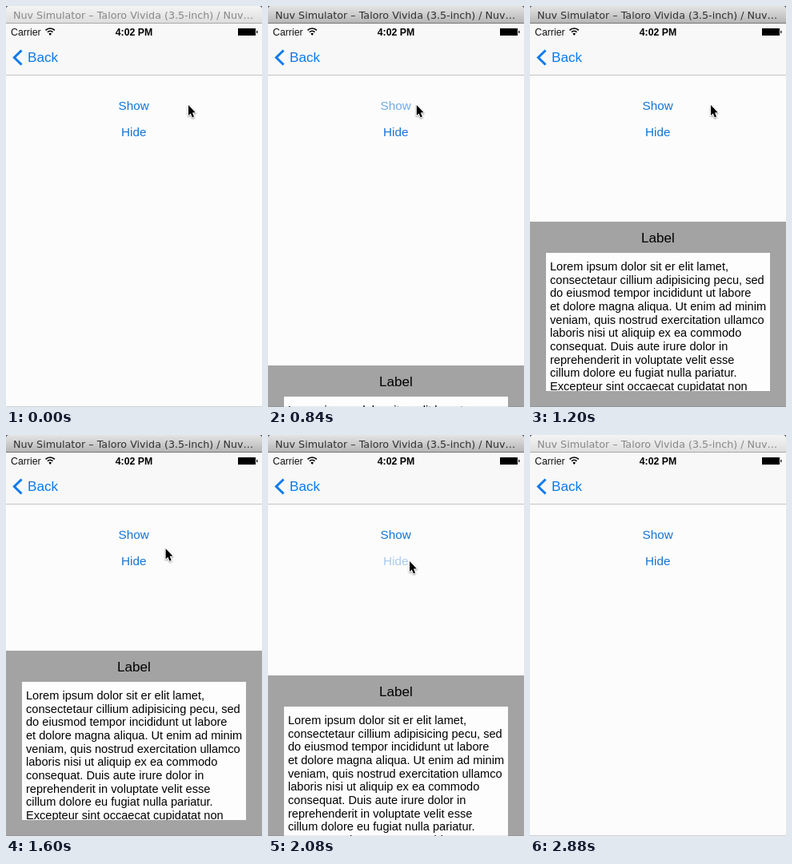
Recreate the animation shown at these times as an HTML page with a canvas. Size 320 by 502 pixels, loop 2.92 s.

```html
<!DOCTYPE html>
<html lang="en">
<head>
<meta charset="utf-8">
<title>Sliding panel</title>
<style>
html, body { margin: 0; width: 100%; height: 100%; overflow: hidden; background: #fcfcfc; }
canvas { display: block; width: 320px; height: 502px; }
</style>
</head>
<body>
<canvas id="stage"></canvas>
<script>
const W = 320, H = 502, LOOP = 2920, STEP = 40;
const SANS = '"Liberation Sans", Arial, sans-serif';
const BAR_BLUE = '#0a7aec', BUTTON_BLUE = '#1675d2';
const PANEL_TOP = 270;
const PARAGRAPH = [
  'Lorem ipsum dolor sit er elit lamet,',
  'consectetaur cillium adipisicing pecu, sed',
  'do eiusmod tempor incididunt ut labore',
  'et dolore magna aliqua. Ut enim ad minim',
  'veniam, quis nostrud exercitation ullamco',
  'laboris nisi ut aliquip ex ea commodo',
  'consequat. Duis aute irure dolor in',
  'reprehenderit in voluptate velit esse',
  'cillum dolore eu fugiat nulla pariatur.',
  'Excepteur sint occaecat cupidatat non'
];
// time, x, y of the pointer tip
const POINTER = [
  [200, 228, 124], [520, 182, 124], [600, 169, 124], [760, 169, 124],
  [960, 211, 124], [1200, 226, 124], [1320, 226, 124], [1560, 204, 140],
  [1880, 169, 158], [2040, 169, 158], [2280, 217, 158], [2400, 217, 172],
  [2520, 213, 228], [2640, 118, 510]
];

const canvas = document.getElementById('stage');
const ctx = canvas.getContext('2d');
const dpr = window.devicePixelRatio || 1;
canvas.width = W * dpr;
canvas.height = H * dpr;

const clamp = v => Math.max(0, Math.min(1, v));
const progress = (t, start, length) => clamp((t - start) / length);
const smooth = v => v * v * (3 - 2 * v);

function rect(x, y, w, h, color) {
  ctx.fillStyle = color;
  ctx.fillRect(x, y, w, h);
}

function text(str, x, baseline, font, color, align = 'left') {
  ctx.font = font;
  ctx.fillStyle = color;
  ctx.textAlign = align;
  ctx.fillText(str, x, baseline);
}

function polygon(points) {
  ctx.beginPath();
  points.forEach(([x, y]) => ctx.lineTo(x, y));
}

function pointerAt(t) {
  const next = POINTER.findIndex(k => k[0] > t);
  if (next === 0) return POINTER[0].slice(1);
  if (next < 0) return null;
  const [t0, x0, y0] = POINTER[next - 1];
  const [t1, x1, y1] = POINTER[next];
  const p = (t - t0) / (t1 - t0);
  return [x0 + (x1 - x0) * p, y0 + (y1 - y0) * p];
}

function drawTitleBar(active) {
  const shade = ctx.createLinearGradient(0, 0, 0, 21);
  shade.addColorStop(0, active ? '#e4e4e4' : '#f4f4f4');
  shade.addColorStop(1, active ? '#b6b6b6' : '#dedede');
  rect(0, 0, W, 21, shade);
  rect(0, 21, W, 1, active ? '#777777' : '#a8a8a8');
  text('Nuv Simulator – Taloro Vivida (3.5-inch) / Nuv…', 9, 16,
    '12.7px "DejaVu Sans", sans-serif', active ? '#303030' : '#878787');
  ctx.fillStyle = '#555';
  for (const x of [0, W]) {
    const d = x ? -1 : 1;
    polygon([[x, 0], [x + 3 * d, 0], [x + d, 1], [x, 3]]);
    ctx.fill();
  }
}

function drawBars() {
  rect(0, 22, W, 64, '#f8f8f8');
  rect(0, 86, W, 1, '#c4c4c4');
  text('Carrier', 6, 37, '12.3px ' + SANS, '#111');
  text('4:02 PM', 160, 37, 'bold 12.3px ' + SANS, '#000', 'center');

  ctx.strokeStyle = '#000';
  ctx.lineWidth = 1.7;
  for (const r of [4.6, 8]) {
    ctx.beginPath();
    ctx.arc(55.2, 36, r, -Math.PI * 0.75, -Math.PI * 0.25);
    ctx.stroke();
  }
  ctx.fillStyle = '#000';
  ctx.beginPath();
  ctx.moveTo(55.2, 37);
  ctx.arc(55.2, 36, 2.2, -Math.PI * 0.8, -Math.PI * 0.2);
  ctx.fill();

  rect(290, 28, 22, 9, '#000');
  rect(313, 31, 1.5, 3, '#222');

  polygon([[19.5, 55.5], [10.3, 64.5], [19.5, 73.5]]);
  ctx.strokeStyle = BAR_BLUE;
  ctx.lineWidth = 3;
  ctx.stroke();
  text('Back', 27, 70, '17.1px ' + SANS, BAR_BLUE);
}

function drawButton(label, baseline, alpha) {
  ctx.globalAlpha = alpha;
  text(label, 159.7, baseline, '15.3px ' + SANS, BUTTON_BLUE, 'center');
  ctx.globalAlpha = 1;
}

function drawPanel(shown) {
  if (shown <= 0) return;
  ctx.save();
  ctx.translate(0, PANEL_TOP + Math.round((H - PANEL_TOP) * (1 - shown)));
  rect(0, 0, W, H - PANEL_TOP, '#a3a3a3');
  text('Label', 160, 26, '17.1px ' + SANS, '#000', 'center');
  rect(20, 39, 280, 173, '#fdfdfd');
  ctx.beginPath();
  ctx.rect(20, 39, 280, 173);
  ctx.clip();
  PARAGRAPH.forEach((line, i) =>
    text(line, 25, 61 + i * 16.65, '14.6px ' + SANS, '#000'));
  ctx.restore();
}

function drawPointer(position) {
  if (!position) return;
  ctx.save();
  ctx.translate(...position);
  polygon([[0, 0], [0, 13], [2.8, 10.4], [4.9, 15.4], [7, 14.5], [5, 9.6], [8.8, 9.2]]);
  ctx.closePath();
  ctx.lineJoin = 'round';
  ctx.strokeStyle = '#fff';
  ctx.lineWidth = 2;
  ctx.shadowColor = 'rgba(0,0,0,.4)';
  ctx.shadowBlur = 2 * dpr;
  ctx.shadowOffsetY = dpr;
  ctx.stroke();
  ctx.shadowColor = 'transparent';
  ctx.fillStyle = '#000';
  ctx.fill();
  ctx.restore();
}

// Opacity of a button that is pressed, then fades back after release
function pressAlpha(t, press, release) {
  return t < press ? 1 : 0.2 + 0.8 * progress(t, release, 200);
}

function draw(t) {
  ctx.setTransform(dpr, 0, 0, dpr, 0, 0);
  rect(0, 0, W, H, '#fcfcfc');
  const active = t >= 640 && t < 2840;
  drawTitleBar(active);
  drawBars();
  drawButton('Show', 129.6, pressAlpha(t, 640, 740));
  drawButton('Hide', 162.6, pressAlpha(t, 2000, 2040));
  drawPanel(smooth(progress(t, 760, 260)) - smooth(progress(t, 2020, 260)));
  rect(0, H - 1, W, 1, active ? 'rgba(0,0,0,.08)' : 'rgba(0,0,0,.18)');
  drawPointer(pointerAt(t));
}

const start = performance.now();
function frame() {
  const t = (performance.now() - start) % LOOP;
  draw(Math.floor(t / STEP) * STEP);
  requestAnimationFrame(frame);
}
frame();
</script>
</body>
</html>
```
